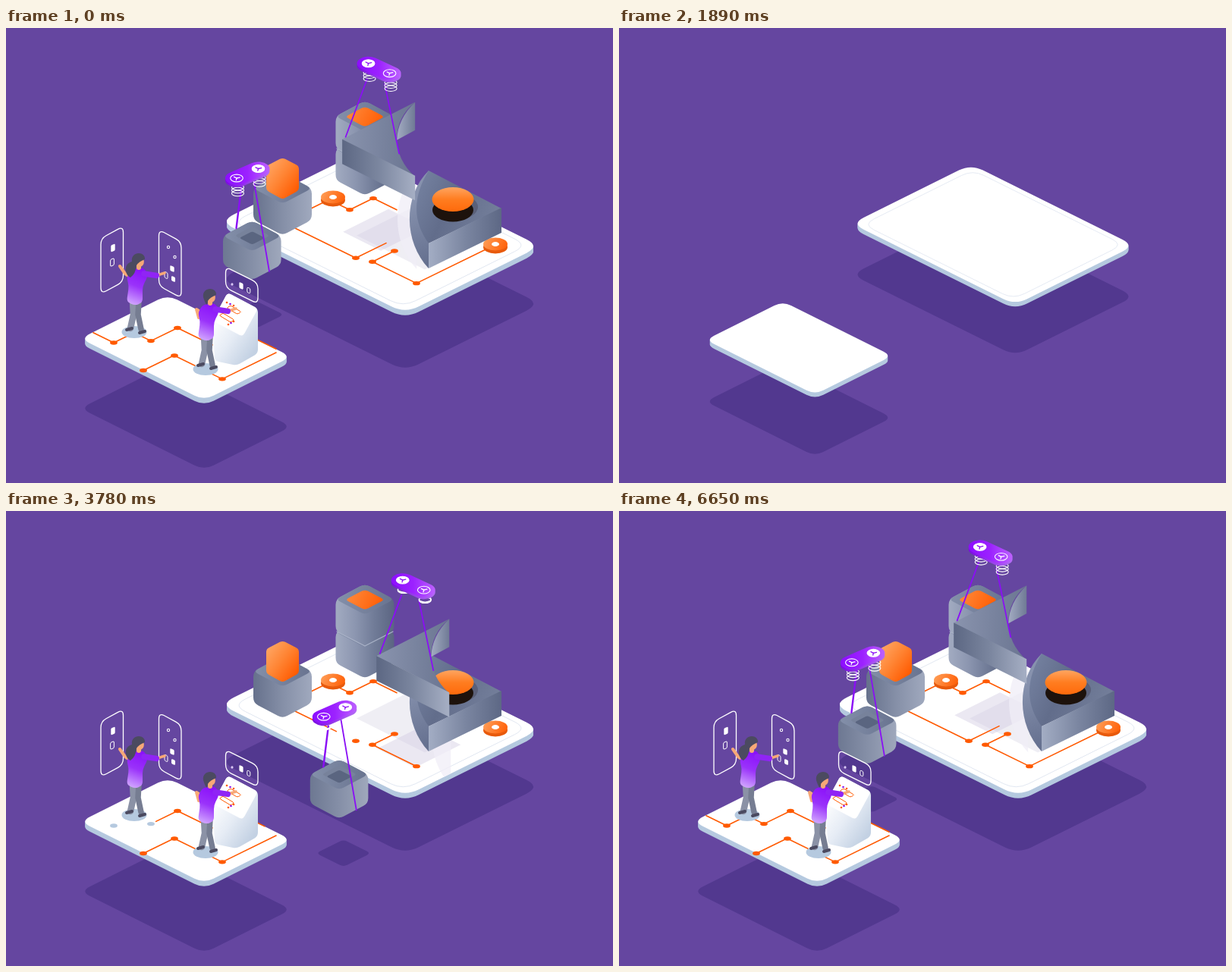
An HTML page with a canvas for the animation above (6720 ms loop, 800 px wide and 600 px high).

```html
<!DOCTYPE html>
<html lang="en">
<head>
<meta charset="utf-8">
<title>Floating platforms</title>
<style>
html, body { margin: 0; width: 100%; height: 100%; overflow: hidden; background: #6546a0; }
canvas { display: block; width: 800px; height: 600px; }
</style>
</head>
<body>
<canvas id="stage" width="800" height="600"></canvas>
<script>
const c = document.getElementById('stage').getContext('2d');
const LOOP = 6720, STEP = 70;
const ORANGE = '#ff5a00', MIST = '#b5c9df', SHADE = '#52388f', VIOLET = '#8a0ff5';
const SKIN = '#f7a877', HAIR = '#4b4a60', GREY = '#8b92a6';

const clamp = v => Math.max(0, Math.min(1, v));
const ramp = (t, a, b) => clamp((t - a) / (b - a));
const mix = (a, b, k) => a + (b - a) * k;

// Grow from nothing with one overshoot.
function pop(t, start) {
  const x = ramp(t, start, start + 700) - 1;
  return 1 + 2.7 * x ** 3 + 1.7 * x ** 2;
}

function lin(x0, y0, x1, y1, ...cols) {
  const g = c.createLinearGradient(x0, y0, x1, y1);
  cols.forEach((col, i) => g.addColorStop(i / (cols.length - 1), col));
  return g;
}

function scaled(x, y, s, draw) {
  if (s <= 0.001) return;
  c.save();
  c.translate(x, y);
  c.scale(s, s);
  c.translate(-x, -y);
  draw();
  c.restore();
}

function moved(x, y, draw) {
  c.save();
  c.translate(x, y);
  draw();
  c.restore();
}

// Polygon from flat coordinates, corners cut by d and curved.
function trace(p, d = 0) {
  const n = p.length / 2, at = i => [p[(i % n) * 2], p[(i % n) * 2 + 1]];
  c.beginPath();
  for (let i = 0; i < n; i++) {
    const [ax, ay] = at(i + n - 1), [x, y] = at(i), [bx, by] = at(i + 1);
    const la = Math.hypot(ax - x, ay - y), lb = Math.hypot(bx - x, by - y);
    const ka = Math.min(d / la, 0.5), kb = Math.min(d / lb, 0.5);
    c.lineTo(mix(x, ax, ka), mix(y, ay, ka));
    if (d) c.quadraticCurveTo(x, y, mix(x, bx, kb), mix(y, by, kb));
  }
  c.closePath();
}

function poly(p, fill, d) {
  trace(p, d);
  c.fillStyle = fill;
  c.fill();
}

function outline(p, col, w, d) {
  trace(p, d);
  c.strokeStyle = col;
  c.lineWidth = w;
  c.stroke();
}

// Flat isometric tile: top corner, then extents to the right and left.
const tile = (x, y, a, b = a, k = 0.5) =>
  [x, y, x + a, y + a * k, x + a - b, y + (a + b) * k, x - b, y + b * k];

// Upright isometric face.
const face = (x, y, w, h, k) => [x, y, x + w, y + w * k, x + w, y + w * k + h, x, y + h];

function line(col, w, ...p) {
  c.beginPath();
  for (let i = 0; i < p.length; i += 2) c.lineTo(p[i], p[i + 1]);
  c.strokeStyle = col;
  c.lineWidth = w;
  c.lineCap = c.lineJoin = 'round';
  c.stroke();
}

function oval(x, y, rx, ry, fill, stroke) {
  c.beginPath();
  c.ellipse(x, y, rx, ry, 0, 0, 7);
  if (fill) { c.fillStyle = fill; c.fill(); }
  if (stroke) { c.strokeStyle = stroke; c.lineWidth = 1.1; c.stroke(); }
}

// Circuit that zigzags between the two floor axes, shown up to share k,
// with a dot on each bend that lights up as the line arrives.
function wire(k, idle, x, y, ...steps) {
  const p = [x, y], total = steps.reduce((sum, s) => sum + Math.abs(s), 0);
  steps.forEach((s, i) => p.push(x += s, y += (i % 2 ? -0.49 : 0.49) * s));
  const len = total * Math.hypot(1, 0.49);
  if (k > 0) {
    c.setLineDash([len * k, len + 9]);
    line(ORANGE, 1.6, ...p);
    c.setLineDash([]);
  }
  let run = 0;
  for (let i = 1; i < steps.length; i++) {
    run += Math.abs(steps[i - 1]);
    oval(p[2 * i], p[2 * i + 1], 4.9, 2.7, run <= total * k + 0.5 ? ORANGE : idle);
  }
}

function slab(p, d, drop) {
  const shift = dy => p.map((v, i) => i % 2 ? v + dy : v);
  poly(shift(drop), SHADE, d);
  for (let i = 7; i > 0; i--) poly(shift(i), MIST, d);
  poly(p, '#fff', d);
}

function block(x, top, w, h, body, lid) {
  const d = w * 0.53;
  poly([x, top, x + w, top + d, x + w, top + d + h, x, top + 2 * d + h, x - w, top + d + h, x - w, top + d],
    lin(x - w, 0, x + w, 0, ...body), 7);
  poly(tile(x, top, w, w, 0.53), lin(x - w, 0, x + w, 0, ...lid), 7);
}

function ring(x, y) {
  oval(x, y + 3, 16, 8.5, '#e85a0c');
  oval(x, y - 1, 16, 8.5, lin(x - 16, y - 8, x + 16, y + 8, '#ffa05a', ORANGE));
  oval(x, y - 1, 5, 3, '#fff');
}

const smallTop = tile(213, 352, 163, 115);
const bigTop = tile(460, 166.5, 244, 178, 0.497);

function bigPlatform() {
  slab(bigTop, 20, 76);
  scaled(493, 271, 0.92, () => outline(bigTop, '#dfe5f0', 1, 20));
}

function smallWires(t) {
  const b = mix(ramp(t, 2900, 3010) * 0.23, 1, ramp(t, 3010, 3700));
  wire(ramp(t, 3150, 4480), MIST, 272, 418, -46, -35, -22, -27, -27);
  wire(ramp(t, 3700, 3900), MIST, 331, 411, 25);
  moved(222, 432, () => {
    wire(clamp(b * 4), MIST, -41, 19.5, 0, 41);
    wire(ramp(b, 0.23, 1), MIST, 0, 0, 63, 71);
    oval(0, 0, 4.9, 2.7, b > 0.2 ? ORANGE : MIST);
  });
  oval(169, 401, 16.5, 8, MIST);
  oval(263, 450, 16.5, 8, MIST);
}

function bigWires(t) {
  const early = ramp(t, 2700, 3000), late = ramp(t, 3200, 4480);
  wire(early, ORANGE, 398, 240, 0, 33);
  wire(early, ORANGE, 431, 229, 22, 31, 31);
  wire(late, ORANGE, 381, 264, 80, 40);
  wire(late, ORANGE, 512, 294, 0, -29, 58, 104);
  ring(431, 224);
  ring(645, 286);
}

const lidTone = ['#8490aa', '#68738f'];

function tower() {
  const body = ['#a2abc1', '#8c96b0', '#707b97', '#5b6582'];
  block(473, 139, 38.5, 41, body, lidTone);
  block(473, 96, 38.5, 42, body, lidTone);
  line('#a9b2c7', 1.3, 436, 159, 473, 178, 510, 159);
  poly(tile(473, 103.5, 26, 26, 0.52), lin(450, 105, 496, 130, '#ff8b3d', ORANGE), 5);
}

function baseBlock() {
  block(364.5, 191, 38.5, 41.5, ['#66718c', '#858fa7', '#a0a9be'], lidTone);
  const orange = lin(343, 180, 386, 212, '#ffa765', '#ff8433', ORANGE);
  poly([364.5, 171, 386, 182, 386, 214, 364.5, 226, 343, 214, 343, 182], orange, 4);
}

function wedgeCurve() {
  c.beginPath();
  c.moveTo(557, 188);
  c.bezierCurveTo(523, 222, 524, 282, 557, 317);
  c.closePath();
}

function wedge() {
  wedgeCurve();
  c.fillStyle = lin(530, 230, 560, 310, '#8792ae', '#65708f');
  c.fill();
  c.beginPath();
  c.moveTo(557, 188);
  c.lineTo(653, 238);
  c.lineTo(557, 284);
  c.quadraticCurveTo(525, 240, 557, 188);
  c.fillStyle = lin(535, 200, 640, 250, '#7784a3', '#626d8b', '#727d99');
  c.fill();
  poly(face(557, 284, 96, 33, -0.49), lin(557, 0, 653, 0, '#a3adc4', '#7b86a1', '#5d6885'));
  oval(593, 236, 29, 17, 'rgba(50,45,60,.3)');
  oval(589, 240, 27, 15.5, '#1d120c');
  oval(589, 226, 27.5, 16, lin(589, 210, 589, 242, '#ffa560', '#ff7d20', '#ff6a0c'));
}

// Pale patches on the floor; two of them follow the carried wall.
function floorShade(dx, dy, on) {
  c.save();
  trace(bigTop, 20);
  c.clip();
  poly(tile(533, 238, 90, 71), 'rgba(205,202,220,.32)');
  if (on) moved(dx, dy, () => {
    poly(tile(505, 238, 50, 60), 'rgba(205,198,222,.4)');
    c.translate(-15, 0);
    wedgeCurve();
    c.fillStyle = 'rgba(240,238,247,.75)';
    c.fill();
  });
  c.restore();
}

function wall() {
  c.beginPath();
  c.moveTo(540, 97);
  c.lineTo(540, 134);
  c.lineTo(516, 147);
  c.quadraticCurveTo(517, 119, 540, 97);
  c.fillStyle = lin(516, 0, 540, 0, '#a3acc2', '#6f7a95');
  c.fill();
  c.beginPath();
  c.moveTo(444, 146);
  c.lineTo(540, 97);
  c.bezierCurveTo(508, 122, 508, 168, 540, 195);
  c.closePath();
  c.fillStyle = lin(444, 146, 540, 150, '#8a94ae', '#6a7591');
  c.fill();
  poly(face(444, 146, 96, 32.5, 0.5), lin(444, 0, 540, 0, '#5c6783', '#7b869f', '#a6afc4'));
}

function rotor(x, y, full) {
  oval(x, y, 8.3, 4.9, full ? '#fff' : null, '#fff');
  for (let i = 0; i < 3; i++) {
    const a = Math.PI * (0.55 + i * 2 / 3);
    line(full ? VIOLET : '#fff', 1.3, x, y, x + 4.4 * Math.cos(a), y + 2.7 * Math.sin(a));
  }
}

function capsule(ax, ay, bx, by, col) {
  c.save();
  c.scale(1, 0.6);
  line(col, 30, ax, ay / 0.6, bx, by / 0.6);
  c.restore();
}

function drone(ax, ay, bx, by, fullA, spread) {
  if (spread > 0) for (const [x, y] of [[ax, ay], [bx, by]])
    for (let i = 0; i < 3; i++) oval(x + 1.5, y + 12 + i * 4 * spread, 8, 3.8, null, '#fff');
  capsule(ax, ay + 3, bx, by + 3, lin(ax - 15, 0, bx + 15, 0, '#7a0be0', '#b46cf5'));
  capsule(ax, ay, bx, by, lin(ax - 15, 0, bx + 15, 0, '#8c0dff', '#9c22ff', '#bd62ff'));
  rotor(ax, ay, fullA);
  rotor(bx, by, !fullA);
}

function wallCarrier(spread) {
  wall();
  line(VIOLET, 1.8, 477, 66, 448.5, 143);
  line(VIOLET, 1.8, 500, 73, 519, 165);
  drone(478.5, 46, 506.5, 59, true, spread);
}

function cubeCarrier(spread) {
  block(324.3, 254, 38.3, 38, ['#6d7892', '#858fa7', '#9fa8bc'], lidTone);
  poly(tile(324.5, 262, 23, 23, 0.52), '#77829b', 4);
  poly(tile(324.5, 268, 17, 17, 0.52), '#5a6580', 3);
  line(VIOLET, 2.4, 311, 203, 303.5, 264);
  line(VIOLET, 1.8, 326, 198, 347, 321);
  drone(304, 198, 332.5, 185.5, false, spread);
}

function icon(x, y, w, h, k, full) {
  const p = face(x - w / 2, y - h / 2 - k * w / 2, w, h, k);
  if (full) poly(p, '#fff', 1.5);
  else outline(p, '#fff', 1, 1.5);
}

const panel = (...f) => outline(face(...f), '#fff', 1.3, 8);

function panels(busy) {
  panel(125, 277.5, 29.5, 73, -0.54);
  panel(201.5, 266, 29.5, 74, 0.54);
  icon(141, 290, 5.4, 9, -0.4, true);
  icon(219, 317.5, 5.4, 7, 0.4, true);
  icon(220.5, 331, 5, 6.4, 0.4, true);
  icon(211, 326, 4, 8, 0.5);
  oval(214, 289, 1.6, 1.8, null, '#fff');
  if (busy) return icon(143, 293, 5, 9, -0.4, true);
  icon(140, 309, 4.8, 9, -0.4);
  oval(222.5, 302, 1.6, 1.8, null, '#fff');
}

function consolePanel(busy) {
  panel(289.5, 315, 42.5, 27.5, 0.5);
  icon(310, 340, 5.2, 8, 0.4, true);
  if (busy) return;
  oval(298, 338, 1.6, 1.8, '#d9c8f5');
  icon(319.8, 346, 4, 6.6, 0.4);
}

function desk(busy) {
  poly([292, 349, 332, 370, 332, 429, 304, 445, 275, 439, 273, 386],
    lin(275, 380, 332, 420, '#fff', '#e6ecf5', '#c3d1e3'), 5);
  poly([292, 349, 332, 370, 312, 407, 272, 386], '#fff', 5);
  outline(tile(286, 376, 15, 5, 0.6), ORANGE, 1, 2);
  if (!busy) outline(tile(296, 366, 14, 5, 0.6), ORANGE, 1, 2);
  for (let i = 0; i < 3; i++) {
    const col = i % 2 ? VIOLET : ORANGE;
    oval(291 + i * 4.5, 362 + i * 2, 1.3, 1.2, col);
    oval(293 + i * 3.5, 391 - i * 2, 1.3, 1.2, col);
  }
}

// Arm from shoulder to hand, the outer part bare.
function arm(x, y, hx, hy) {
  const ex = mix(x, hx, 0.6), ey = mix(y, hy, 0.6) + 3;
  line(SKIN, 3.6, ex, ey, hx, hy);
  line('#9024f5', 7.5, x, y, ex, ey);
}

// Worker standing at (x, y); the back hand is given relative to the feet.
function worker(x, y, backX, backY, ponytail) {
  moved(x, y, () => {
    line(GREY, 8.5, -3, -42, -2, -24, -6, -6);
    line('#767d92', 7.5, 5, -42, 4, -24, 8, -5);
    line(HAIR, 4, -11, -4, -4, -6);
    line(HAIR, 4, 6, 0, 13, -2);
    line(SKIN, 4, -7, -74, -13, -78, backX, backY);
    poly([-5, -84, 12, -86, 17, -75, 10, -61, 10, -40, 0, -36, -11, -41, -8, -62, -11, -73],
      lin(10, -84, -8, -40, '#8a10fa', '#9a32fa', '#cfa2ff'), 5);
    arm(12, -78, 39, -79);
    line(SKIN, 6, 5, -89, 5, -86);
    oval(6, -94, 5.9, 7.2, SKIN);
    c.beginPath();
    c.moveTo(13, -97);
    c.bezierCurveTo(14, -108, -6, -108, -4, -94);
    if (ponytail) c.bezierCurveTo(-16, -91, -13, -76, -6, -73);
    c.quadraticCurveTo(1, -78, 2, -89);
    c.quadraticCurveTo(5, -94, 13, -97);
    c.fillStyle = HAIR;
    c.fill();
  });
}

function scene(t) {
  // The wall glides in, turns once and leaves; the cube keeps its course.
  const approach = ramp(t, 3010, 5850), leave = ramp(t, 5850, 7420);
  const wx = mix(mix(70, -25, approach), 18.5, leave);
  const wy = mix(mix(58.6, 9, approach), -6, leave);
  const course = 1 - Math.min(1.19, Math.max(0, (t - 3010) / 3710) ** 1.07);
  const cx = 141 * course, cy = 90 * course;
  const spread = ramp(t, 3100, 6600);
  const base = pop(t, 1690), cast = pop(t, 2160), kit = pop(t, 2390);
  const arrive = Math.min(1, pop(t, 2790));
  const busy = t > 5200 && t < 6000;
  const cargo = (x, y, draw) => scaled(384, 310, arrive, () => moved(x, y, draw));

  cargo(cx, cy, () => poly(tile(330, 360, 36), SHADE, 6));

  scaled(493, 280, base, bigPlatform);
  scaled(603, 283, cast, () => {
    floorShade(wx, wy, arrive > 0.5);
    bigWires(t);
  });
  scaled(490, 208, pop(t, 1974), tower);
  scaled(364, 240, pop(t, 2300), baseBlock);
  scaled(603, 283, cast, wedge);
  cargo(wx, wy, () => wallCarrier(spread));
  cargo(cx, cy, () => cubeCarrier(spread));

  scaled(237, 424, base, () => slab(smallTop, 14, 92));
  scaled(218, 399, pop(t, 2247), () => smallWires(t));
  scaled(178, 308, kit, () => panels(busy));
  scaled(303, 430, kit, () => desk(busy));
  scaled(311, 345, kit, () => consolePanel(busy || t < 3600));
  scaled(170, 402, arrive, () => worker(170, 402, -20, -88, true));
  scaled(264, 449, arrive, () => worker(264, 449, -10, -67, false));
}

function frame(now) {
  const t = Math.floor((now % LOOP) / STEP) * STEP;
  // The build-up starts late, so the opening moments end the previous run.
  const u = t < 1610 ? t + LOOP : t;
  const slide = 466 * ramp(u, 7420, 8330) ** 3 * 1.3 ** 3;
  c.fillStyle = '#6546a0';
  c.fillRect(0, 0, 800, 600);
  if (slide < 720) moved(-slide, 0, () => scene(u));
  requestAnimationFrame(frame);
}
requestAnimationFrame(frame);
</script>
</body>
</html>
```
